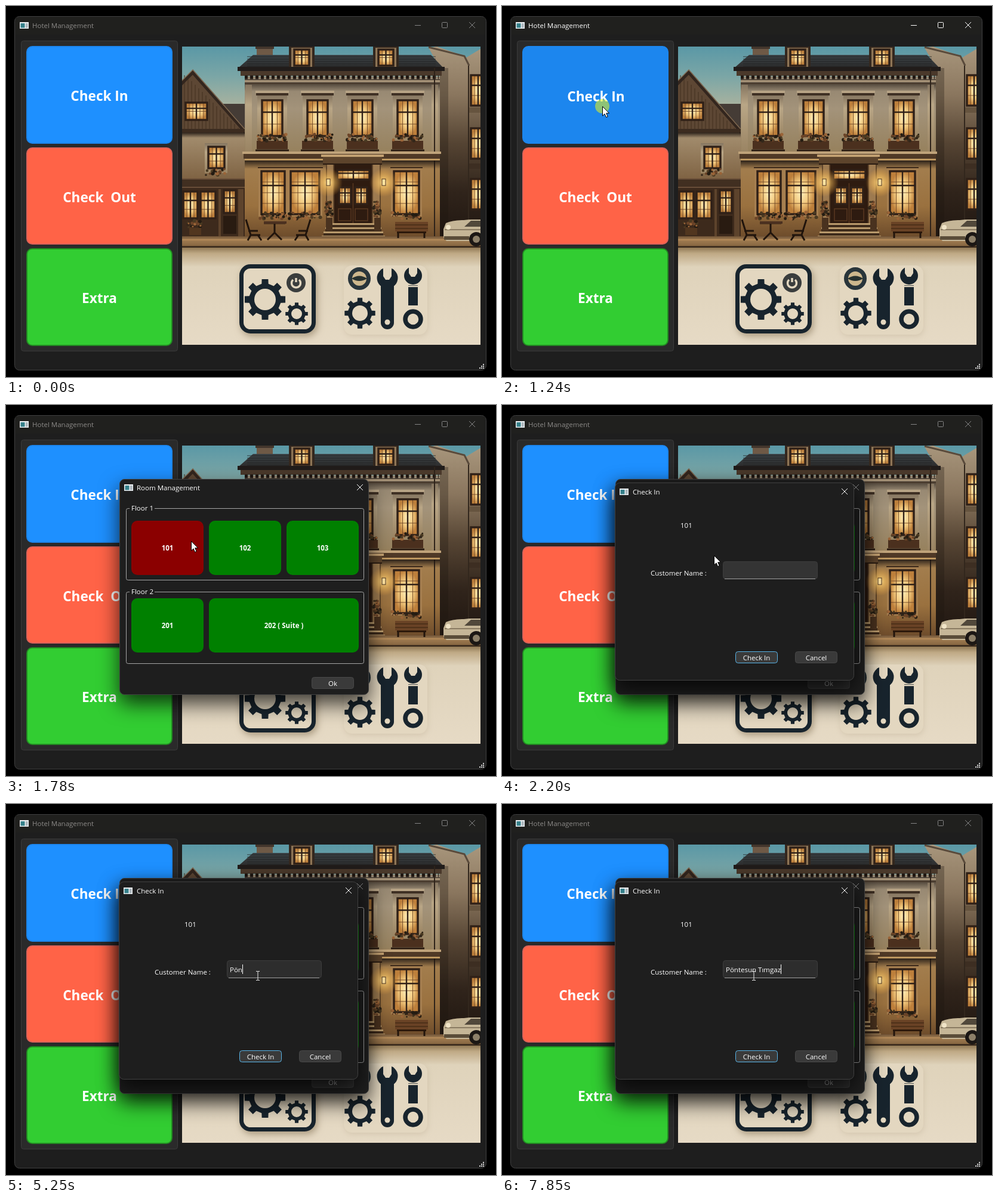
These frames come from a looping animation (821 by 622 pixels, 8 s). An HTML page:

```html
<!DOCTYPE html>
<html lang="en">
<head>
<meta charset="utf-8">
<title>Hotel Management</title>
<style>
html, body { margin: 0; width: 100%; height: 100%; overflow: hidden; background: #000; }
svg { display: block; }
text { font: 11.5px "Open Sans", "Noto Sans", sans-serif; fill: #fff; white-space: pre; }
.mid { text-anchor: middle; }
.bold { font-weight: 700; }
.big { font-size: 22.6px; font-weight: 700; }
.sys { fill: none; stroke: #fff; }
.off text.head { fill: #8c8a88; }
.off .sys { stroke: #858585; }
.off .ok { opacity: .6; }
.dialog { transform-box: fill-box; transform-origin: center; filter: drop-shadow(0 15px 17px #000b); }
</style>
</head>
<body>
<svg id="stage" width="821" height="622" viewBox="0 0 821 622"></svg>
<script>
const LOOP = 8000;
const INK = '#18242d', SAND = '#e3d7c0', WOOD = '#2f2017';
let seed = 7;
const rnd = () => (seed = seed * 16807 % 2147483647) / 2147483647;

// Markup helpers
const R = (x, y, w, h, fill, more = '') =>
  `<rect x="${x}" y="${y}" width="${w}" height="${h}" fill="${fill}" ${more}/>`;
const P = (d, fill, more = '') => `<path d="${d}" fill="${fill}" ${more}/>`;
const L = (d, color, w = 1, more = '') => P(d, 'none', `stroke="${color}" stroke-width="${w}" ${more}`);
const C = (x, y, r, fill, more = '') => `<circle cx="${x}" cy="${y}" r="${r}" fill="${fill}" ${more}/>`;
const T = (x, y, s, cls = '', more = '') => `<text x="${x}" y="${y}" class="${cls}" ${more}>${s}</text>`;
const stops = a => a.map(([o, c]) => `<stop offset="${o}" stop-color="${c}"/>`).join('');
const grad = (id, ...a) => `<linearGradient id="${id}" x2="0" y2="1">${stops(a)}</linearGradient>`;
const glow = (id, ...a) => `<radialGradient id="${id}">${stops(a)}</radialGradient>`;

const defs = `<defs>
  ${grad('sky', [0, '#5a98a6'], [.1, '#7ba6a6'], [.22, '#b3b59d'], [.4, '#c9b894'])}
  ${grad('roof', [0, '#3a4145'], [1, '#2c2c2c'])}
  ${grad('wall', [0, '#8f816d'], [.2, '#a3937a'], [.45, '#97825f'], [.55, '#a37e4e'], [.8, '#9a713f'], [1, '#6b4a2a'])}
  ${grad('trim', [0, '#857560'], [.3, '#b9a686'], [1, '#9a8463'])}
  ${grad('side', [0, '#a8967c'], [.25, '#8a765e'], [.5, '#554433'], [.75, '#30241b'], [1, '#1f1610'])}
  ${grad('left', [0, '#6b523b'], [.4, '#a08a6b'], [.65, '#7d6141'], [1, '#2c1f16'])}
  ${grad('street', [0, '#6e5236'], [.3, '#a17d52'], [.8, '#8a6943'], [1, '#4e3923'])}
  ${grad('sand', [0, '#8f7753'], [.06, '#bfa985'], [.2, '#dfd3bb'], [1, '#e6dac5'])}
  ${grad('shade', [0, '#1c1410dd'], [1, '#1c141000'])}
  ${glow('lit', [0, '#fff0bd'], [.55, '#f2c97e'], [1, '#bd7f3b'])}
  ${glow('lamp', [0, '#fff2c0'], [.25, '#ffcf6fbb'], [1, '#ffb04000'])}
</defs>`;

// Lit window: dark frame, thick middle post and transom, thin glazing bars
function pane(x, y, w, h, cols = 2, rows = 3) {
  let d = '';
  for (let i = 1; i < cols * 2; i++) d += `M${x + w * i / cols / 2} ${y}v${h}`;
  for (let i = 1; i < rows; i++) d += `M${x} ${y + h * i / rows}h${w}`;
  return R(x, y, w, h, 'url(#lit)') + L(d, '#6b4525', .9)
    + L(`M${x + w / 2} ${y}v${h}M${x} ${y + h / 3}h${w}`, WOOD, 2.4)
    + R(x, y, w, h, 'none', `stroke="${WOOD}" stroke-width="3.4"`);
}

function flowers(x, y, w, n = 30) {
  const colors = ['#33271a', '#6b4428', '#241c12', '#9a6438', '#4a3a22'];
  let s = '';
  for (let i = 0; i < n; i++)
    s += C(x + rnd() * w, y + rnd() * 11, 1.2 + rnd() * 1.9, colors[i % 5]);
  return s;
}

function gear(x, y, r, hole, teeth = 8) {
  let d = '';
  for (let i = 0; i < teeth; i++)
    for (const [k, q] of [[-.27, .78], [-.2, 1], [.2, 1], [.27, .78]]) {
      const a = (i + k) / teeth * 2 * Math.PI;
      d += `${d ? 'L' : 'M'}${x + r * q * Math.sin(a)} ${y - r * q * Math.cos(a)}`;
    }
  d += `ZM${x - hole} ${y}a${hole} ${hole} 0 1 0 ${2 * hole} 0a${hole} ${hole} 0 1 0 ${-2 * hole} 0Z`;
  return P(d, INK, 'fill-rule="evenodd"');
}

function leftHouse() {
  let planks = '';
  for (let x = 299; x < 395; x += 6) planks += `M${x} ${Math.max(116, x - 185)}V210`;
  return P('M345 164H402V392H345Z', '#453c36')
    + P('M295 128 313 110 400 208V392H295Z', 'url(#left)')
    + P('M295 128 313 110 400 208H295Z', '#5d4734') + L(planks, '#43311f')
    + L('M293 131 313 111 402 212', '#33261e', 6) + L('M293 127 313 107 404 211', '#806a52', 1.5)
    + pane(301, 162, 36, 29, 3, 2) + R(295, 206, 105, 6, '#3c2c20')
    + R(295, 212, 105, 9, 'url(#shade)')
    + R(333, 230, 38, 50, 'url(#trim)') + pane(339, 236, 27, 36, 2, 3) + flowers(335, 273, 34, 20)
    + R(295, 289, 105, 16, '#412f21') + L('M295 290H400M295 304H400', '#755840', 1.5)
    + R(295, 305, 105, 87, '#3d2a1c')
    + pane(297, 311, 24, 45) + pane(326, 311, 25, 45) + pane(365, 309, 20, 38)
    + R(356, 307, 4, 80, '#5d432c') + R(389, 307, 9, 82, '#5d432c')
    + R(364, 352, 22, 30, '#291b11') + flowers(304, 360, 24, 20) + R(307, 372, 20, 12, '#51361f');
}

function rightHouses() {
  return P('M762 92 795 72V392H762Z', 'url(#side)')
    + P('M708 70 722 68 768 84 776 100V392H727V104Z', 'url(#side)')
    + L('M708 69 768 84 776 100', '#594a3b', 3) + L('M775 100V370', '#32271d', 2)
    + R(727, 104, 14, 286, '#1c14104d')
    + R(776, 170, 19, 9, '#66543f') + R(776, 264, 19, 9, '#3d2e22')
    + [116, 205, 290].map(y => pane(779, y, 24, 51)).join('');
}

function mainHouse() {
  let tiles = '', s = '';
  for (let y = 85; y < 103; y += 4) tiles += `M404 ${y}H720`;
  s += R(420, 68, 27, 24, '#6e5946') + R(418, 68, 31, 4, '#43362c')
    + P('M414 82H712L733 104H389Z', 'url(#roof)') + L(tiles, '#1f2122', .8);
  for (const x of [478, 619])
    s += R(x - 4, 68, 43, 35, '#33271e') + R(x, 70, 35, 33, '#8e7556') + pane(x + 5, 73, 25, 27, 2, 2);
  s += R(400, 118, 327, 272, 'url(#wall)')
    + R(400, 123, 327, 20, 'url(#shade)')
    + R(388, 102, 347, 7, '#211c1a') + R(393, 109, 337, 8, '#4a392b')
    + L('M400 119.5H725', '#1f1712', 6, 'stroke-dasharray="5 4"')
    + R(400, 124, 327, 4, '#a18e74') + L('M400 130H727', '#4b3b2d', 1.5)
    + R(401, 132, 11, 112, 'url(#trim)') + R(713, 132, 11, 112, 'url(#trim)') + L('M718 104V388', '#2e231a', 2)
    + R(396, 244, 333, 4, '#c0a37a') + R(398, 248, 329, 8, '#4f3926') + R(400, 256, 327, 3, '#bc965f')
    + R(400, 259, 327, 14, 'url(#shade)');
  for (const x of [446, 522, 597, 673])
    s += R(x - 28, 142, 56, 4, '#b7a385') + R(x - 27, 146, 54, 4, '#3f3024') + R(x - 25, 150, 50, 72, 'url(#trim)')
      + pane(x - 17, 158, 34, 60) + R(x - 26, 226, 52, 14, '#4b301e')
      + L(`M${x - 28} 242h56`, '#2b1c12', 3) + flowers(x - 25, 215, 50, 40);
  for (const [x, w] of [[428, 39], [477, 48], [650, 42]])
    s += R(x - 5, 271, w + 10, 82, '#a67f50') + L(`M${x - 6} 271h${w + 12}`, '#3d2a1b', 2)
      + pane(x, 277, w, 72, 2, 4) + flowers(x - 3, 346, w + 6, 34);
  // Entrance
  s += R(531, 253, 99, 12, '#5d442c') + R(528, 249, 105, 4, '#c2a071') + L('M531 265h99', '#2b1c12', 2)
    + R(536, 266, 14, 118, '#9d7a50') + R(613, 266, 14, 118, '#9d7a50') + L('M549 266v118M614 266v118M537 266v118M627 266v118', '#4b351f', 1.5)
    + R(550, 266, 63, 118, '#2e1b10') + pane(555, 275, 54, 16, 3, 1)
    + pane(558, 304, 20, 28, 2, 2) + pane(585, 304, 20, 28, 2, 2)
    + L('M581.5 297V364M557 340h21v20h-21zM585 340h21v20h-21z', '#593820', 1.5);
  for (const i of [0, 1, 2, 3])
    s += R(538 - i * 3, 364 + i * 7, 88 + i * 6, 3, '#b8996b') + R(538 - i * 3, 367 + i * 7, 88 + i * 6, 4, '#3e2b1b');
  for (const x of [540, 633])
    s += C(x, 296, 24, 'url(#lamp)') + R(x - 3, 290, 6, 11, '#ffe3a0', 'stroke="#4b321e"');
  for (const x of [535, 616])
    s += flowers(x, 328, 10, 22) + flowers(x, 342, 12, 22) + R(x + 1, 355, 11, 22, '#49321f');
  return s;
}

function streetLife() {
  const chair = 'l8 26h16m-16 0-5 9m17-9 6 9m-22-16h16';
  return R(295, 386, 500, 19, 'url(#street)')
    + L('M295 392H795', '#b98e5b', 1.5) + L('M295 404H795', '#33251a', 2.5)
    + L('M402 358' + chair + 'M432 364h36M450 364v18m-12 10 12-12 12 12M510 358l-8 26h-16m16 0 5 9m-17-9-6 9m22-16h-16', '#20140c', 3)
    + R(432, 361, 38, 4, '#4c3120')
    + R(652, 362, 55, 16, '#694225') + L('M652 367h55m-55 6h55', '#34200f') + R(655, 378, 49, 3, '#2d190b')
    + L('M657 380v9m44-9v9', '#22150c', 3)
    + P('M733 374 737 364Q748 359 767 359L776 358H795V394H738L733 388Z', '#c5b697')
    + P('M768 370 779 360H795V370Z', '#51483b') + L('M735 375H795', '#776750', 1.5)
    + R(734, 386, 42, 6, '#5a4d39') + C(741, 371, 4, '#f0e4c7') + C(788, 391, 12, '#1c1714') + C(788, 391, 6, '#8d8069');
}

function tools() {
  return R(295, 405, 500, 163, 'url(#sand)')
    + R(566, 435, 140, 116, SAND, 'rx="14" style="filter:drop-shadow(1px 3px 4px #9d896833)"')
    + R(394.5, 436.5, 121, 109, SAND, `rx="15" stroke="${INK}" stroke-width="7" style="filter:drop-shadow(3px 5px 6px #7a684a88)"`)
    + gear(434, 492, 34.5, 18) + gear(487, 516, 19, 9)
    + C(486, 464, 16, '#3a3d3d') + L('M481 459a7.5 7.5 0 1 0 10 0M486 456v7', SAND, 3.5)
    + C(592, 457, 15.5, '#cdb78d', 'stroke="#29353b" stroke-width="7"') + P('M579 457q13-9 26 0q-13 8-26 0', '#27312f')
    + gear(593, 515, 26, 13)
    + C(639, 456, 17.5, INK) + P('M632 436h14v17l-4 6h-6l-4-6Z', SAND)
    + P('M628 466h22v65a11 11 0 0 1-22 0Z', INK) + C(639, 530, 4.5, SAND)
    + C(682, 452, 15, INK) + P('M675 435h14v13l-4 6h-6l-4-6Z', SAND)
    + R(674, 468, 16, 34, INK) + L('M670 470h24', SAND, 2.5)
    + C(682, 525, 13, 'none', `stroke="${INK}" stroke-width="7.5"`);
}

const art = `<svg x="295" y="68" width="500" height="500" viewBox="295 68 500 500">`
  + R(295, 68, 500, 500, 'url(#sky)') + leftHouse() + rightHouses() + mainHouse()
  + streetLife() + tools() + `</svg>`;

// Windows and controls
const frame = (x, y, w, h) => R(x + .5, y + .5, w - 1, h - 1, '#1e1e1e', 'rx="8" stroke="#414141"');
const icon = (x, y) => R(x, y, 15, 11, '#e9edf0') + R(x + 1.5, y + 2, 7, 7.5, '#35808a') + R(x + 10, y + 2, 3.5, 7.5, '#a9b3ba');
const cross = (x, y) => `<path class="sys" d="M${x} ${y}l10 10m0-10-10 10"/>`;
const push = (x, y, s, border = '#484848', cls = '') => `<g class="${cls}">`
  + R(x + .5, y + .5, 70, 19, '#3a3a3a', `rx="4" stroke="${border}"`) + T(x + 35.5, y + 15, s, 'mid') + '</g>';
const tile = (y, h, s, fill, border, id) =>
  R(35, y + 1, 243, h - 2, fill, `id="${id}" rx="9" stroke="${border}" stroke-width="2"`)
  + T(156.5, y + h / 2 + 10, s, 'big mid', `id="${id}Text"`);
const room = (x, y, w, s) => R(x, y, w, 91, '#008000', `rx="10" id="room${s.slice(0, 3)}"`)
  + T(x + w / 2, y + 50, s, 'bold mid');
const group = (y, s) => R(201.5, y + .5, 398, 120, 'none', 'rx="3" stroke="#a5a5a5"')
  + R(207, y - 1, 42, 4, '#1e1e1e') + T(210, y + 4, s);

let grip = '';
for (let i = 0; i < 3; i++) for (let j = 2 - i; j < 3; j++) grip += R(793 + j * 3, 600 + i * 3, 2, 2, '#d8d8d8');

document.getElementById('stage').innerHTML = defs
  + `<g id="main">` + frame(14, 17, 791, 594) + R(16, 19, 787, 29, '#20201e')
  + icon(23, 27) + T(44, 37, 'Hotel Management', 'head')
  + '<path class="sys" d="M685 32.5h10M731.5 27.5h7q1 0 1 1v7q0 1-1 1h-7q-1 0-1-1v-7q0-1 1-1"/>' + cross(776, 27)
  + R(25.5, 58.5, 262, 520, '#2a2a2a', 'rx="4" stroke="#3b3b3b"')
  + tile(67, 164, 'Check In', '#1e90ff', '#1c86ee', 'enter')
  + tile(237, 163, 'Check  Out', '#ff6347', '#dc6259', 'leave')
  + tile(406, 164, 'Extra', '#32cd32', '#228b22', 'extra')
  + art + grip + '</g>'
  + '<g id="rooms" class="dialog">' + frame(190, 124, 418, 362)
  + icon(198, 133) + T(219, 143, 'Room Management', 'head') + cross(588, 133)
  + group(173, 'Floor 1') + room(210, 194, 121, '101') + room(340, 194, 121, '102') + room(470, 194, 121, '103')
  + group(313, 'Floor 2') + room(210, 324, 121, '201') + room(340, 324, 251, '202 ( Suite )')
  + push(512, 456, 'Ok', '#484848', 'ok') + '</g>'
  + '<g id="form" class="dialog">' + frame(189, 130, 401, 332)
  + icon(197, 140) + T(219, 150, 'Check In') + cross(569, 140)
  + T(299, 206, '101') + T(249, 286, 'Customer Name :')
  + R(370.5, 262.5, 158, 29, '#2d2d2d', 'id="field" rx="4" stroke="#3d3d3d"') + L('M373 291.5H525', '#a0a0a0')
  + T(375, 282, '', '', 'id="typed"') + R(375, 269, 1, 16, '#fff', 'id="caret"')
  + push(391, 413, 'Check In', '#58b4e8') + push(491, 413, 'Cancel') + '</g>'
  + C(0, 0, 12, '#ff0', 'id="click" opacity=".5"')
  + '<g id="pointer">' + P('M.5.5V16.2L4 12.8 6.6 18.6 9.2 17.5 6.7 11.8H11.6Z', '#fff', 'id="arrow" stroke="#000"')
  + L('M-3-7.5h2.5l.5.5.5-.5H3M0-7V7M-3 7.5h2.5L0 7l.5.5H3', '#eee', 1, 'id="beam"') + '</g>';

const $ = id => document.getElementById(id);
const show = (id, on) => $(id).setAttribute('visibility', on ? 'visible' : 'hidden');
const set = (id, key, v) => $(id).setAttribute(key, v);
const within = (t, a, b) => t >= a && t < b;

const NAME = 'Pöntesun Tımgaz';
const KEYS = [3990, 4190, 5250, 5450, 5580, 5780, 5880, 5980, 6180, 6860, 7050, 7270, 7520, 7710, 7850];
const CLICKS = [[1160, 1300], [1850, 1930], [2650, 2710]];
const PATH = [[130, 706, 581], [1080, 168, 168], [1440, 168, 168], [1770, 310, 228], [2010, 310, 228], [2450, 422, 288]];
const OPEN_ROOMS = 1300, OPEN_FORM = 1950, FOCUS = 2650;

function pointerAt(t) {
  const i = PATH.findIndex(p => p[0] > t);
  if (i < 1) return PATH[i < 0 ? PATH.length - 1 : 0].slice(1);
  const [a, b] = [PATH[i - 1], PATH[i]], u = (t - a[0]) / (b[0] - a[0]), e = u * u * (3 - 2 * u);
  return [a[1] + (b[1] - a[1]) * e, a[2] + (b[2] - a[2]) * e];
}

function popUp(id, t) {
  const p = Math.min(1, Math.max(0, t / 250)), g = $(id);
  g.style.display = t < 0 ? 'none' : '';
  g.style.transform = p < 1 ? `scale(${1 - .1 * (1 - p) ** 3})` : 'none';
  g.style.opacity = Math.min(1, p * 3.5);
}

function draw(t) {
  const [x, y] = pointerAt(t);
  const over = (l, top, r, b) => within(x, l, r) && within(y, top, b);
  const pressed = within(t, ...CLICKS[0]);

  set('main', 'class', pressed ? '' : 'off');
  set('enter', 'fill', within(t, 130, OPEN_ROOMS) && over(34, 67, 279, 231) ? '#1c86ee' : '#1e90ff');
  set('enterText', 'transform', pressed ? 'translate(1 1)' : '');

  popUp('rooms', t - OPEN_ROOMS);
  set('rooms', 'class', t < OPEN_FORM ? 'dialog' : 'dialog off');
  set('room101', 'fill', over(210, 194, 331, 285) ? '#8b0000' : '#008000');

  popUp('form', t - OPEN_FORM);
  const n = KEYS.filter(k => k <= t).length;
  const since = t - (n ? KEYS[n - 1] : FOCUS - 110);
  $('typed').textContent = NAME.slice(0, n);
  set('caret', 'x', Math.round(375 + (n ? $('typed').getComputedTextLength() : 0)));
  show('caret', t >= FOCUS && since % 1120 < 590);
  set('field', 'fill', t < FOCUS ? '#343434' : '#2d2d2d');

  set('click', 'transform', `translate(${x} ${y})`);
  show('click', CLICKS.some(c => within(t, ...c)));
  const beam = t > OPEN_FORM && over(370, 262, 529, 292);
  set('pointer', 'transform', `translate(${Math.round(x)} ${Math.round(y)})`);
  show('arrow', t >= 130 && !beam);
  show('beam', beam);
}

const start = performance.now();
function tick() {
  draw((performance.now() - start) % LOOP);
  requestAnimationFrame(tick);
}
tick();
</script>
</body>
</html>
```
